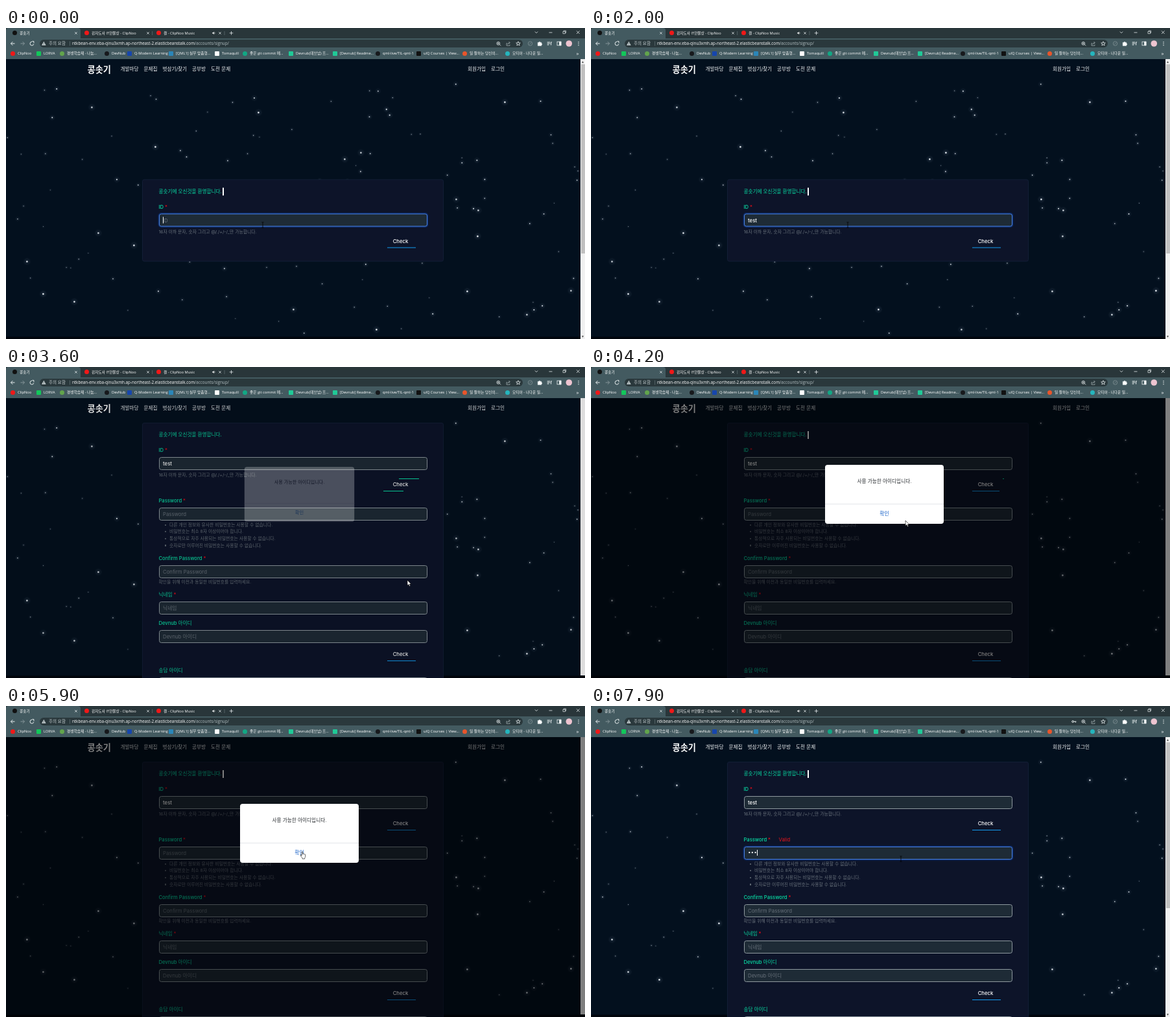
Animation of 893 by 480 pixels, one loop 8 s. Source, as an HTML page with a canvas:

```html
<!DOCTYPE html>
<html lang="ko">
<head>
<meta charset="utf-8">
<title>콩솟기</title>
<style>
html, body { margin: 0; width: 100%; height: 100%; overflow: hidden; background: #03101e; }
#stage { position: absolute; left: 0; top: 0; width: 893px; height: 480px; overflow: hidden;
  font-family: Inter, "Noto Sans CJK KR", "Noto Sans CJK", sans-serif; color: #fff; }
#stage div, #stage span, #stage canvas, #stage svg { position: absolute; box-sizing: border-box; }
#stage span { line-height: 20px; white-space: pre; }
#stage span i { font-style: normal; color: #f00c18; }
#stage .menu { display: flex; gap: 8px; top: 54px; }
#stage .menu span { position: static; font-size: 7.6px; color: #eef0f2; }
.mid { transform: translateX(-50%); }
.layer { left: 0; top: 0; width: 893px; height: 480px; }
#card { left: 210px; top: 85.5px; width: 465px; border-radius: 3px; background: #0d1429; border: 1px solid #121e36; }
.field { border: 1px solid #8e999f; }
.field.focus { border-color: #4b82e4; box-shadow: 0 0 0 1.5px rgba(13, 90, 230, .3); }
#veil { top: 48px; height: 432px; background: rgba(0, 0, 0, .5); }
#modal { left: 361px; top: 151px; width: 183px; height: 90.5px; border-radius: 4px; background: #fff; }
#browser { font-family: "Open Sans", "Noto Sans CJK KR", "Noto Sans CJK", sans-serif; }
</style>
</head>
<body>
<div id="stage">
  <canvas id="sky" class="layer" width="893" height="480"></canvas>
  <div id="nav" class="layer"></div>
  <div id="head" class="layer"><div id="card"></div></div>
  <div id="rest" class="layer"></div>
  <div id="bar"></div>
  <div id="veil" class="layer"></div>
  <div id="modal"></div>
  <div id="browser" class="layer"></div>
  <svg id="icons" class="layer" viewBox="0 0 893 480" fill="none" stroke="#e8eeef" stroke-width="1">
    <path d="M13.5 24H7.5m2.8-2.8L7.5 24l2.8 2.8M40 21.2a2.9 2.9 0 1 0 2.8 3.4M40.3 20.6h2.6v2.6"/>
    <path d="M22.5 24h6m-2.8-2.8l2.8 2.8-2.8 2.8" stroke="#86969a"/>
    <path d="M58.3 20.8l3.3 6h-6.6z" fill="#c9d2d4" stroke="none"/>
    <path d="M58.3 22.8v1.8m0 .6v.8" stroke="#2a383c" stroke-width=".7"/>
    <path d="M98.5 20.5v7" stroke="#647478" stroke-width=".7"/>
    <g stroke-width=".8">
      <path d="M761.2 25.4l2 2M758 23.8h2.6m-1.3-1.3v2.6"/><circle cx="759.3" cy="23.8" r="2.4"/>
      <path d="M773 23.5h-1v3.7h5v-1.5M773.5 25.5q.5-2.7 3.5-2.7m-1.5-1.8l1.8 1.8-1.8 1.8" stroke="#a2afb2"/>
      <path d="M790 20.8l.9 2.2 2.4.1-1.9 1.5.7 2.4-2.1-1.4-2.1 1.4.7-2.4-1.9-1.5 2.4-.1z"/>
      <circle cx="808.5" cy="24" r="3.2" stroke="#819195"/><path d="M807 25.5l3-3" stroke="#819195"/>
      <path d="M820.3 22.4h1.6a1 1 0 1 1 2 0h1.8v1.6a1 1 0 1 1 0 2v1.3h-5.4z" fill="#fff"/>
      <path d="M834.7 22h4.5m-4.5 2h4.5m-4.5 2h2.7m3.2 .5v-4.6h1.4" stroke-width="1"/>
      <rect x="850" y="21.2" width="6" height="5.6"/><path d="M853.5 21.2h2.5v5.6h-2.5z" fill="#fff"/>
    </g>
    <circle cx="868.3" cy="24" r="4.8" fill="#eec4d0" stroke="none"/>
    <path d="M883 21v1.2m0 1.3v1.2m0 1.3v1.2" stroke-width="1.2"/>
    <path d="M106.2 6.2l3.4 3.4m0-3.4l-3.4 3.4M217.3 6.2l3.4 3.4m0-3.4l-3.4 3.4M328.3 6.2l3.4 3.4m0-3.4l-3.4 3.4M347.5 5v5.6M344.7 7.8h5.6M815.8 5.6l2.2 2.2 2.2-2.2M837.5 7h5M880 4.4l4.6 4.6m0-4.6L880 9" stroke-width=".8"/>
    <path d="M859 5.3h3.4v3.4H859zM860.2 5.2V4.2h3.4v3.4h-1" stroke-width=".7"/>
    <path d="M318.3 7h1l1.4-1.3v4.2l-1.4-1.3h-1z" fill="#fff" stroke="none"/><path d="M321.6 6.4q1 1.3 0 2.7" stroke-width=".6"/>
    <path d="M225.7 5v6M337 5v6" stroke="#718084" stroke-width=".6"/>
    <g id="key"><circle cx="743.2" cy="24" r="1.4"/><path d="M744.8 24h3.6m-1 0v1.6"/></g>
  </svg>
  <svg id="mouse" class="layer" viewBox="0 0 893 480" stroke-linejoin="round">
    <path id="beam" d="M-1.6-4.2h1.2l.4.4.4-.4h1.2M0-3.8v7.6M-1.6 4.2h1.2l.4-.4.4.4h1.2" fill="none" stroke="#000" stroke-width=".8"/>
    <path id="arrow" d="M0 0v8.2l1.9-1.7 1.3 2.9 1.4-.6-1.3-2.8h2.5z" fill="#fff" stroke="#000" stroke-width=".6"/>
    <path id="hand" d="M-.9.7q0-.8.8-.8.8 0 .8.8v3l.2-.4q.7-.5 1.3.2.8-.5 1.3.3 1-.3 1.2.6v2.8q0 1.4-1 2.4v1.3H.1V9.7L-2.8 6q-.4-1 .5-1 .7.1 1.4 1.1z" fill="#fff" stroke="#000" stroke-width=".6"/>
  </svg>
</div>
<script>
const $ = id => document.getElementById(id);
const GREEN = '#08dfa6', HINT = '#67707a', BLUE = '#149cf0';

function box(parent, x, y, w, h, color, radius = 0) {
  const el = document.createElement('div');
  el.style.cssText = `left:${x}px;top:${y}px;width:${w}px;height:${h}px;background:${color};border-radius:${radius}`;
  parent.append(el);
  return el;
}
function text(parent, x, y, str, size = 7.6, color = '#fff', weight = 400) {
  const el = document.createElement('span');
  el.textContent = str;
  el.style.cssText = `left:${x}px;top:${y - 10}px;font-size:${size}px;color:${color};font-weight:${weight}`;
  parent.append(el);
  return el;
}
function centered(...args) {
  const el = text(...args);
  el.className = 'mid';
  return el;
}
function menu(parent, x, items) {
  const el = document.createElement('div');
  el.className = 'menu';
  el.style.left = x + 'px';
  el.innerHTML = items.map(s => `<span>${s}</span>`).join('');
  parent.append(el);
}
function label(parent, y, str, required) {
  const el = text(parent, 235.5, y, str, 7.6, GREEN, 500);
  if (required) el.insertAdjacentHTML('beforeend', '<i> *</i>');
}
function field(parent, y, hint) {
  const el = box(parent, 235.5, y - 10, 414.5, 20, '#1e2b36', '3.5px');
  el.className = 'field';
  const value = text(parent, 242, y, hint, 7.8, HINT);
  const caret = box(parent, 242, y - 4.8, .9, 9.6, '#fff');
  caret.style.visibility = 'hidden';
  return { el, value, caret, hint };
}
function check(parent, y) {
  centered(parent, 608.5, y, 'Check', 7.75, '#fff', 500);
  return box(parent, 588, y + 10.2, 43.5, 1.6, BLUE);
}

// Browser frame
const B = $('browser');
box(B, 0, 0, 893, 16, '#29363a');
box(B, 0, 0, 115, 17, '#435a60', '4px 4px 0 0');
box(B, 0, 15.5, 893, 32.5, '#435a60');
box(B, 52, 18, 745, 12, '#2a383c', '6px');
const tabs = [['#111', '콩솟기'], ['#f01818', '감자도사 IT만물상 - ClipNoo'], ['#f01818', '결 - ClipNoo Music']];
tabs.forEach(([color, str], i) => {
  const x = 21 + 111 * i;
  box(B, x - 11, 4.3, 7, 7, color, '50%');
  text(B, x, 7.8, str, 5.7);
});
text(B, 66, 24, '주의 요함', 6.6, '#c3cccf');
text(B, 102, 24, 'ntkbean-env.eba-qinu3xmh.ap-northeast-2.elasticbeanstalk.com', 6.3)
  .insertAdjacentHTML('beforeend', '<b style="font-weight:400;color:#b4c0c3">/accounts/signup/</b>');
const O = '50%', S = '1px';
[['#f01818', O, 18, 'ClipNoo'], ['#12c75a', S, 58, 'LORVA'], ['#62a44c', O, 94, '평생학습제 - 나눔...'],
 ['#17191c', O, 163, 'DevNub'], ['#1646ad', S, 198, 'Q-Modern Learning'], ['#2b86b8', S, 262, '[QML1] 실무 맞춤형...'],
 ['#fff', S, 333, 'Tomaquill'], ['#12a784', O, 376, '좋은 git commit 메...'], ['#20c997', S, 447, 'Devnub(데브넙) 프...'],
 ['#20c997', S, 515, '[Devnub] Readme...'], ['#17191c', O, 581, 'qml-live/TIL-qml-1'], ['#111', S, 644, 'ulQ Courses | View...'],
 ['#e8552b', O, 715, '일 잘하는 당신의...'], ['#25b5bd', O, 781, '모티아 - 나다운 일...']]
  .forEach(([color, shape, x, str]) => {
    box(B, x - 11, 35.6, 7, 7, color, shape);
    text(B, x, 39.2, str, 5.7);
  });
text(B, 879.5, 38.6, '»', 8);

// Site header
const N = $('nav');
text(N, 125.5, 63.5, '콩솟기', 13.2, '#fff', 900);
menu(N, 176.5, ['개발마당', '문제집', '벗삼기/찾기', '공부방', '도전 문제']);
menu(N, 712, ['회원가입', '로그인']);

// Form head
const H = $('head');
text(H, 235.5, 104.5, '콩솟기에 오신것을 환영합니다.', 7.6, GREEN, 500);
const titleCaret = box(H, 334.3, 98.7, 1.6, 12.3, '#fff');
label(H, 129, 'ID', true);
const idField = field(H, 149, 'ID');
text(H, 235.5, 166.5, '16자 이하 문자, 숫자 그리고 @/./+/-/_만 가능합니다.', 6.8, HINT);
const under = check(H, 180.5);
const over = box(H, 606, 172.2, 31, 1.1, GREEN);

// Form continuation
const R = $('rest');
label(R, 206.5, 'Password', true);
const valid = text(R, 289.5, 206.5, 'Valid', 7.7, '#e8141c');
const pwField = field(R, 226.5, 'Password');
['다른 개인 정보와 유사한 비밀번호는 사용할 수 없습니다.', '비밀번호는 최소 8자 이상이어야 합니다.',
 '통상적으로 자주 사용되는 비밀번호는 사용할 수 없습니다.', '숫자로만 이루어진 비밀번호는 사용할 수 없습니다.']
  .forEach((str, i) => {
    const y = 243.7 + i * 10.6;
    box(R, 244.8, y - 1.2, 2.4, 2.4, HINT, '50%');
    text(R, 252, y, str, 6.8, HINT);
  });
label(R, 295.5, 'Confirm Password', true);
field(R, 315.5, 'Confirm Password');
text(R, 235.5, 332.3, '확인을 위해 이전과 동일한 비밀번호를 입력하세요.', 6.8, HINT);
label(R, 352, '닉네임', true);
field(R, 372, '닉네임');
label(R, 396.3, 'Devnub 아이디');
field(R, 416.3, 'Devnub 아이디');
check(R, 442.5);
label(R, 468.5, '송담 아이디');
field(R, 488.5, '');

// Scrollbar
const bar = $('bar');
bar.style.cssText = 'left:886px;top:48px;width:7px';
const thumb = box(bar, .5, 8, 6, 292, '#c1c1c1');
centered(bar, 3.5, 4, '▴', 6, '#555');
centered(bar, 3.5, 428, '▾', 6, '#555');

// Dialog
const M = $('modal');
centered(M, 91.5, 26, '사용 가능한 아이디입니다.', 7.65, '#24282c');
box(M, 0, 59.5, 183, 1, '#e3e6e9');
centered(M, 91.5, 75.2, '확인', 7.8, '#1660c8');

// Night sky: a few landmark stars among seeded random ones
let seed = 20;
const random = () => (seed = (seed * 16807) % 2147483647) / 2147483647;
const landmarks = [[132, 122], [230, 183], [389, 130], [522, 202], [547, 192], [769, 114], [694, 264], [728, 281], [727, 321],
  [711, 406], [803, 442], [871, 405], [142, 316], [197, 335], [32, 360], [57, 410], [105, 422], [443, 434], [571, 465]];
const star = (x, y, r) => ({ x, y, r, pace: 300 + 400 * random(), phase: 7 * random() });
const stars = landmarks.map(([x, y]) => star(x + .4, y + .4, 1.25));
for (let i = 0; i < 100; i++) stars.push(star(885 * random(), 84 + 392 * random(), .5 + .6 * random()));
const ctx = $('sky').getContext('2d');

function disc(x, y, r, color) {
  ctx.fillStyle = color;
  ctx.beginPath();
  ctx.arc(x, y, r, 0, 7);
  ctx.fill();
}
function sky(t) {
  ctx.fillStyle = '#03101e';
  ctx.fillRect(0, 0, 893, 480);
  for (const { x, y, r, pace, phase } of stars) {
    const a = .35 + .45 * r + .1 * Math.sin(t / pace + phase), glow = 5 * r;
    const halo = ctx.createRadialGradient(x, y, 0, x, y, glow);
    halo.addColorStop(0, `rgba(170,190,215,${a * .16})`);
    halo.addColorStop(1, 'rgba(170,190,215,0)');
    disc(x, y, glow, halo);
    disc(x, y, r, `rgba(245,250,255,${a})`);
  }
  ctx.fillStyle = '#01050c';
  ctx.fillRect(0, 476.5, 893, 4);
}

// Timeline
const GROW = 3600, CLOSE = 6000, FOCUS = 6900, KEY = 7300;
const moves = [
  { from: 2300, to: 3000, x: 619, y: 329 }, { from: 3700, to: 4200, x: 485, y: 237 },
  { from: 4700, to: 5300, x: 457, y: 225 }, { from: 6000, to: 6350, x: 421, y: 240 },
  { from: 6500, to: 6900, x: 478, y: 236 }];
const ramp = (t, a, b) => {
  const u = Math.min(1, Math.max(0, (t - a) / (b - a)));
  return u * u * (3 - 2 * u);
};
const mix = (a, b, u) => a + (b - a) * u;
const show = (el, on) => el.style.visibility = on ? 'visible' : 'hidden';

function type(f, t, start, end, firstKey, gap, str) {
  const n = Math.min(str.length, Math.max(0, Math.floor((t - firstKey) / gap) + 1));
  const focus = t >= start && t < end;
  f.value.textContent = n ? str.slice(0, n) : f.hint;
  f.value.style.color = n ? '#fff' : HINT;
  f.value.style.fontWeight = n ? 500 : 400;
  f.el.classList.toggle('focus', focus);
  const last = n ? firstKey + (n - 1) * gap : start;
  show(f.caret, focus && (t - last) % 1000 < 500);
  f.caret.style.left = 242.2 + (n ? f.value.offsetWidth : 0) + 'px';
}

function pointer(t) {
  let x = 396, y = 304, kind = 'beam';
  for (const m of moves) {
    const u = ramp(t, m.from, m.to);
    x = mix(x, m.x, u);
    y = mix(y, m.y, u);
  }
  if (t < GROW) kind = x > 582 && y > 317 ? 'hand' : y > 318 ? 'arrow' : 'beam';
  else if (t < CLOSE) kind = Math.abs(x - 453) < 25 && y > 215 && y < 241 ? 'hand' : 'arrow';
  for (const id of ['beam', 'arrow', 'hand']) {
    show($(id), id === kind);
    $(id).setAttribute('transform', `translate(${x} ${y})`);
  }
}

function draw(t) {
  sky(t);
  const long = t >= GROW, locked = long && t < CLOSE, typing = t >= KEY;
  H.style.transform = long ? 'none' : 'translateY(147.5px)';
  $('card').style.height = long ? '420px' : '127.5px';
  R.style.display = long ? 'block' : 'none';

  const beat = t % 1000;
  show(titleCaret, beat < 300 || beat >= 800);
  type(idField, t, 0, GROW, 800, 170, 'test');
  type(pwField, t, FOCUS, 8000, KEY, 200, '•••');
  pwField.value.style.fontFamily = typing ? '"DejaVu Sans", sans-serif' : '';
  show(valid, typing);
  show($('key'), typing);

  const hover = ramp(t, 2900, 3200) * (1 - ramp(t, 3700, 4300));
  under.style.left = mix(588, 581.5, hover) + 'px';
  under.style.width = mix(43.5, 31.5, hover) + 'px';
  under.style.height = mix(1.6, 1.1, hover) + 'px';
  under.style.background = hover > .5 ? GREEN : BLUE;
  over.style.left = mix(637, 606, hover) + 'px';
  over.style.width = 31 * hover + 'px';

  const fade = locked ? ramp(t, GROW - 100, GROW + 200) : long ? 1 - ramp(t, CLOSE - 100, CLOSE + 200) : 0;
  $('veil').style.opacity = fade;
  M.style.opacity = fade;
  M.style.transform = `scale(${.9 + .1 * fade})`;
  bar.style.background = locked ? '#fff' : '#f1f1f1';
  bar.style.height = locked ? '428px' : '432px';
  for (const el of bar.children) show(el, !locked);
  thumb.style.height = (long ? 256 : 292) + 'px';
  pointer(t);
}

function loop(now) {
  draw(Math.floor(now % 8000 / 100) * 100);
  requestAnimationFrame(loop);
}
requestAnimationFrame(loop);
</script>
</body>
</html>
```
